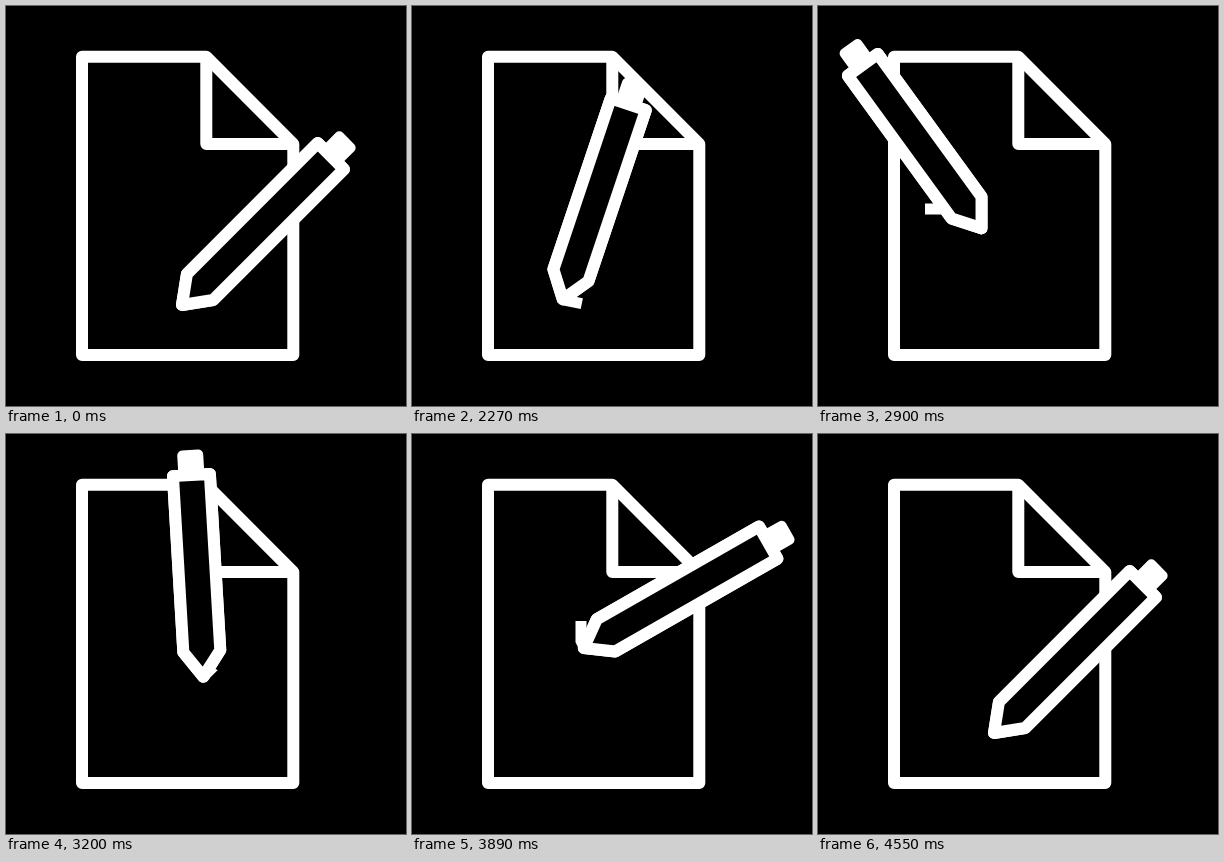
Animation of 400 by 400 pixels, one loop 4.58 s. Source, as an HTML page with a canvas:

```html
<!DOCTYPE html>
<html lang="en">
<head>
<meta charset="utf-8">
<title>Writing pen</title>
<style>
  html, body { margin: 0; width: 100%; height: 100%; overflow: hidden; background: #000; }
  canvas { display: block; width: 400px; height: 400px; }
</style>
</head>
<body>
<canvas id="stage" width="400" height="400"></canvas>
<script>
const ctx = document.getElementById('stage').getContext('2d');
const LOOP = 4580, START = 2030, END = 4550, STEP = 30;
const TRAIL_MS = 180, SMOOTH_MS = 60;

// Corners of the scribble: time, x, y
const scribble = [
  [2030, 176, 299], [2310, 147, 293], [2420, 121, 266], [2610, 95, 217],
  [2720, 107, 203], [2790, 126, 203], [2900, 166, 224], [3070, 202, 238],
  [3320, 193, 247], [3410, 210, 254], [3450, 210, 240], [3500, 196, 222],
  [3710, 169, 187], [3800, 169, 207], [3900, 172, 213], [4160, 182, 265],
  [4300, 170, 285], [4400, 176, 299]
];

// Lean of the pen: time, degrees from upright
const lean = [
  [2030, 45], [2420, 2], [2720, -22], [2900, -39.5], [3230, 0],
  [3500, 44.5], [3890, 61], [4160, 60], [4550, 45]
];

function at(keys, t) {
  const next = keys.findIndex(key => key[0] > t);
  if (next < 0) return keys[keys.length - 1].slice(1);
  if (next === 0) return keys[0].slice(1);
  const a = keys[next - 1], b = keys[next];
  const u = (t - a[0]) / (b[0] - a[0]);
  return a.slice(1).map((v, i) => v + (b[i + 1] - v) * u);
}

// Moving average, so the pen rounds the corners
function smoothAt(keys, t) {
  const reach = Math.max(0, Math.min(SMOOTH_MS, t - START, END - t));
  const n = 6, sum = keys[0].slice(1).fill(0);
  for (let i = -n; i <= n; i++) {
    at(keys, t + reach * i / n).forEach((v, k) => { sum[k] += v / (2 * n + 1); });
  }
  return sum;
}

function line(points, width, closed) {
  ctx.beginPath();
  points.forEach(([x, y]) => ctx.lineTo(x, y));
  if (closed) ctx.closePath();
  ctx.lineWidth = width;
  ctx.stroke();
}

function drawPaper() {
  ctx.lineJoin = 'round';
  line([[76, 50.8], [200.3, 50.8], [287.3, 138], [287.3, 349], [76, 349]], 12, true);
  line([[200.3, 51], [200.3, 138], [287, 138]], 12);
}

function drawInk(t) {
  const from = Math.max(START, t - TRAIL_MS);
  const corners = scribble.filter(([time]) => time > from && time < t);
  ctx.lineJoin = 'miter';
  line([at(scribble, from), ...corners.map(key => key.slice(1)), at(scribble, t)], 11);
}

function drawPen(t) {
  const [x, y] = smoothAt(scribble, t);
  const tilt = smoothAt(lean, t)[0] * Math.PI / 180;
  const top = -202 - 12 * Math.max(0, Math.sin(tilt));
  const half = 18.5, neck = -25.5;
  const body = [[0, 0], [-half, neck], [-half, top], [half, top], [half, neck]];
  ctx.save();
  ctx.translate(x, y);
  ctx.rotate(tilt);
  ctx.fillStyle = '#fff';
  ctx.beginPath();
  ctx.roundRect(-13, top - 25, 26, 25, 5);
  ctx.fill();
  ctx.lineJoin = 'round';
  line(body, 12, true);
  ctx.fillStyle = '#000';
  ctx.fill();
  line(body, 12, true);
  ctx.restore();
}

function draw(now) {
  const t = now % LOOP;
  const shown = t < START ? START : START + Math.floor((t - START) / STEP) * STEP;
  ctx.fillStyle = '#000';
  ctx.fillRect(0, 0, 400, 400);
  ctx.strokeStyle = '#fff';
  drawPaper();
  if (shown > START && shown < END) drawInk(shown);
  drawPen(shown);
}

let origin = null;
function tick(now) {
  if (origin === null) origin = now;
  draw(now - origin);
  requestAnimationFrame(tick);
}
requestAnimationFrame(tick);
</script>
</body>
</html>
```
